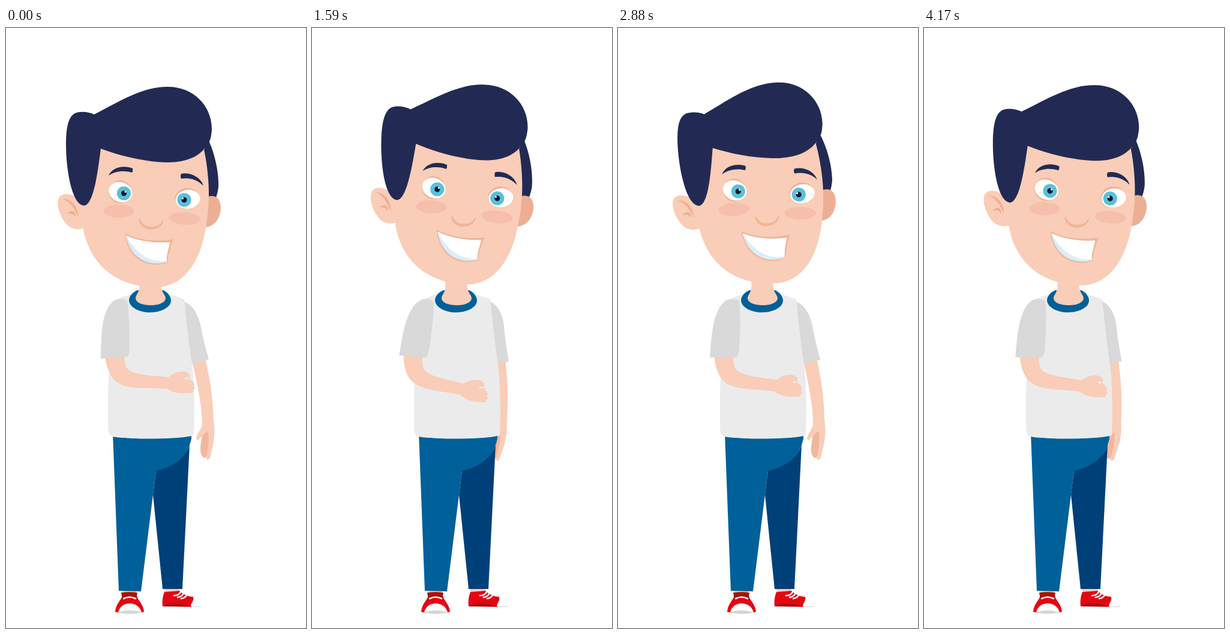
These frames come from a looping animation (500x1000 px, 4.2 s). An HTML page:

```html
<!DOCTYPE html>
<html lang="en">
<head>
<meta charset="utf-8">
<title>Standing boy</title>
<style>
  html, body { margin: 0; width: 100%; height: 100%; overflow: hidden; background: #fff; }
  svg { display: block; width: 100%; height: 100%; }
  .skin { fill: #f9cdb7; }
  .shade { fill: #edaf93; }
  .lip { fill: #efb698; }
  .hair { fill: #222a54; }
  .shirt { fill: #ebebeb; }
  .sleeve { fill: #d9d9d9; }
  .blue { fill: #00609a; }
  .navy { fill: #004079; }
  .red { fill: #e30613; }
  .maroon { fill: #a51409; }
  .white { fill: #fff; }
  .sole { fill: #d5d5d5; }
  .blush { fill: #f6bfab; }
  .iris { fill: #5bc0d8; }
  .pupil { fill: #151a35; }
  .lace { fill: none; stroke: #fff; stroke-width: 2.6; stroke-linecap: round; }
</style>
</head>
<body>
<svg viewBox="0 0 500 1000">
  <g id="rightArm">
    <path class="skin" d="M308,540 L332,550 C341,590 345,620 346,655 C349,670 347,685 345,695 L340,717 C337,721 334,719 333,715 L329,717 L325,709 L326,681 L320,687 C315,686 317,680 322,672 C326,666 327,662 327,655 C325,620 318,590 311,560Z"/>
    <path class="shade" fill-opacity=".75" d="M336,672 C340,685 336,700 335,712 L332,716 L328,714 C323,710 323,700 325,690 C326,680 330,675 336,672Z"/>
    <path class="sleeve" d="M294,455 C312,461 322,478 326,505 C330,525 335,540 338,553 Q324,556 309,560 L294,500Z"/>
  </g>

  <g id="shoes">
    <path class="skin" d="M194,936 H217 V943 H194Z M264,933 H289 V941 H264Z"/>
    <path class="red" d="M182,973 C183,960 191,955 194,946 H218 C220,955 229,960 230,973 C222,976 190,976 182,973Z"/>
    <path class="maroon" d="M192,941 Q206,939 219,941 L217,953 Q206,946 194,953Z"/>
    <path class="lace" d="M196,951 Q206,946 216,951"/>
    <path class="white" d="M187,974 C191,954 221,954 226,974Z"/>
    <path class="sole" d="M187,974 Q206,967 226,974 Q206,979 187,974Z"/>
    <path class="red" d="M264,940 L289,938 C296,945 306,948 312,948 L315,965 L261,964 C260,955 261,948 264,940Z"/>
    <path class="maroon" d="M261,964 C275,955 299,961 309,964Z"/>
    <path class="white" d="M312,947 C321,948 327,954 327,964 H308 C309,956 314,955 312,947Z"/>
    <path class="lace" d="M280,946 Q288,946 291,940 M286,949 Q293,948 296,942 M292,951 Q299,950 302,944"/>
    <path class="sole" d="M309,964 H326 V965 H309Z"/>
  </g>

  <path class="blue" d="M178,675 H309 V684 C303,715 280,735 250,738 L245,778 L225,939 L188,938Z"/>
  <path class="navy" d="M306,695 L294,935 H261 L245,778 L250,738 C275,733 298,719 306,695Z"/>

  <path class="shirt" d="M188,452 C195,447 205,445 212,443 H268 C280,446 290,449 297,452 C302,500 306,535 310,560 C315,600 314,650 313,679 C290,686 200,686 178,681 C171,680 170,672 170,660 V610 C171,560 178,500 188,452Z"/>
  <path class="blue" d="M219,437 C209,441 205,449 205,454 C206,466 222,474 240,474 C258,474 275,466 275,454 C275,449 271,441 262,437Z"/>
  <path class="skin" d="M222,420 C225,440 216,444 216,450 C216,458 228,462 241,462 C254,462 266,458 266,450 C266,444 256,440 259,420Z"/>

  <g id="leftArm">
    <path class="skin" d="M165,545 L197,544 C197,562 200,570 212,574 C230,580 255,580 271,582 C280,574 290,571 300,573 C306,575 307,580 305,584 L312,590 C315,593 314,596 312,597 C317,599 314,603 312,603 C314,608 309,609 305,608 C290,610 278,608 268,601 L225,600 C195,599 180,592 173,575 C168,565 166,558 165,545Z"/>
    <ellipse class="shirt" cx="301" cy="584" rx="3.5" ry="1.8"/>
    <path class="sleeve" d="M158,551 C158,500 162,465 182,453 C190,450 198,451 202,455 C206,480 206,520 206,530 C206,545 204,549 197,548 Q178,550 158,551Z"/>
  </g>

  <g id="head">
    <path class="hair" d="M338,188 C348,210 355,240 354,265 C353,275 350,282 348,290 H336 L330,203Z"/>
    <path class="shade" d="M334,282 C350,276 358,285 358,300 C357,320 345,332 331,332Z"/>
    <path class="skin" d="M126,290 C115,276 94,272 88,283 C82,295 92,320 104,330 C112,336 122,337 130,333Z"/>
    <path class="shade" d="M95,285 C108,284 121,298 120,315 C114,300 108,291 95,285Z M102,310 C108,301 118,306 115,315 C113,309 108,309 102,310Z"/>
    <path class="skin" d="M140,240 L125,300 C126,375 166,433 255,432 C300,428 325,385 333,333 C337,310 338,290 338,275 C338,250 334,220 330,203 L158,195Z"/>
    <ellipse class="blush" cx="188" cy="305" rx="25.5" ry="11"/>
    <ellipse class="blush" cx="298" cy="317.5" rx="26" ry="10.5" transform="rotate(4 298 317)"/>
    <path class="hair" d="M158,201 C153,240 146,295 130,296 C108,294 100,230 100,195 C100,165 104,148 115,142 C125,138 138,140 147,144 C185,125 225,98 268,98 C312,97 344,130 343,170 C342,180 341,186 338,191 C326,212 305,224 268,224 C230,223 190,213 158,201Z"/>
    <path class="hair" d="M171,246 C177,232 196,228 211,234 Q212,238 210,241 C198,237 182,238 171,246Z M292,243 C305,240 324,247 329,263 C318,252 305,249 292,251 Q290,247 292,243Z"/>
    <ellipse class="shade" cx="190" cy="273" rx="18.8" ry="19"/>
    <ellipse class="shade" cx="302" cy="284" rx="20.5" ry="17.3" transform="rotate(-8 302 284)"/>
    <g class="eye">
      <ellipse class="white" cx="191" cy="273.5" rx="20" ry="16.5" transform="rotate(22 191 273)"/>
      <circle class="iris" cx="196.5" cy="275.5" r="11.6"/>
      <circle class="pupil" cx="196.5" cy="275.5" r="4.6"/>
      <circle class="white" cx="199" cy="273" r="1.6"/>
    </g>
    <g class="eye">
      <ellipse class="white" cx="303" cy="285.3" rx="20.5" ry="15.8" transform="rotate(-8 303 285)"/>
      <circle class="iris" cx="297" cy="286.5" r="11.6"/>
      <circle class="pupil" cx="297" cy="286.5" r="4.6"/>
      <circle class="white" cx="294.5" cy="284" r="1.6"/>
    </g>
    <path class="lip" d="M222,317 C220,328 230,336 242,336 C255,335 263,328 262,319 C258,326 256,331 242,331 C230,331 228,326 222,317Z"/>
    <path id="lips" class="lip"/>
    <path id="teethShade" fill="#d9eefb"/>
    <path id="teeth" class="white"/>
  </g>
</svg>
<script>
const LOOP = 4200, STEP = 30, BLINK_AT = 870;
const $ = id => document.getElementById(id);
const eyes = document.querySelectorAll('.eye');

// The head sways between a few poses.
const poses = [
  { t: 0, x: 0, turn: 0 },
  { t: 390, x: 0, turn: 3.1 },
  { t: 870, x: 10.3, turn: 1.7 },
  { t: 1590, x: 6, turn: 2.3 },
  { t: 2800, x: 12.3, turn: -3.2 },
  { t: 4500, x: 10.8, turn: 1.4 }
];

const clamp = v => Math.max(0, Math.min(1, v));
const mix = (a, b, u) => a + (b - a) * u;
const smooth = u => u * u * (3 - 2 * u);

// Rises from 0 to peak and back at constant speed.
const pingPong = (t, period, peak) => peak * (1 - Math.abs(1 - 2 * (t % period) / period));

function headPose(t) {
  const next = poses.findIndex(pose => pose.t > t);
  const a = poses[next - 1], b = poses[next];
  const u = smooth((t - a.t) / (b.t - a.t));
  return { x: mix(a.x, b.x, u), y: -6 * Math.sin(Math.PI * t / 5100), turn: mix(a.turn, b.turn, u) };
}

// b narrows the smile, inset thins the lower edge.
const lipsPath = b => `M198,342 C220,354 250,357 279,352
  C${274 - 12 * b},364 ${270 - 6 * b},${378 - 6 * b} ${269 + b},${391 - 6 * b}
  C240,${401 - 9 * b} 204,${390 - 5 * b} 198,342Z`;

const teethPath = (b, inset) => `M200,346 C${222 - 7 * b},${356 + 9 * b} ${248 - 3 * b},${359 + 10 * b} ${273 - 7 * b},${357 + 5 * b}
  C271,368 ${267 - 9 * b},${378 - 4 * b} ${268 - 7 * b},${390 - 4 * b - inset}
  C${235 + 2 * inset},${399 - 9 * b - 4 * inset} ${207 + 5 * inset},${382 - 10 * b - 4 * inset} 200,346Z`;

function draw(t) {
  const place = (id, value) => $(id).setAttribute('transform', value);
  const outline = (id, path) => $(id).setAttribute('d', path);

  const head = headPose(t);
  place('head', `translate(${head.x} ${head.y}) rotate(${head.turn} 240 430)`);
  place('leftArm', `rotate(${pingPong(t, 3480, 9.2)} 188 462)`);
  place('rightArm', `rotate(${pingPong(t, 3000, 6.6)} 302 460)`);

  const blink = clamp((180 - Math.abs(t - BLINK_AT)) / 130);
  for (const eye of eyes) {
    const cy = eye.querySelector('ellipse').cy.baseVal.value;
    eye.setAttribute('transform', `translate(0 ${cy * blink}) scale(1 ${1 - blink})`);
    eye.setAttribute('visibility', blink < 1 ? 'visible' : 'hidden');
  }
  outline('lips', lipsPath(blink));
  outline('teethShade', teethPath(blink, 0));
  outline('teeth', teethPath(blink, 1.8));
}

const start = performance.now();
function frame() {
  const t = (performance.now() - start) % LOOP;
  draw(Math.floor(t / STEP) * STEP);
  requestAnimationFrame(frame);
}
frame();
</script>
</body>
</html>
```
